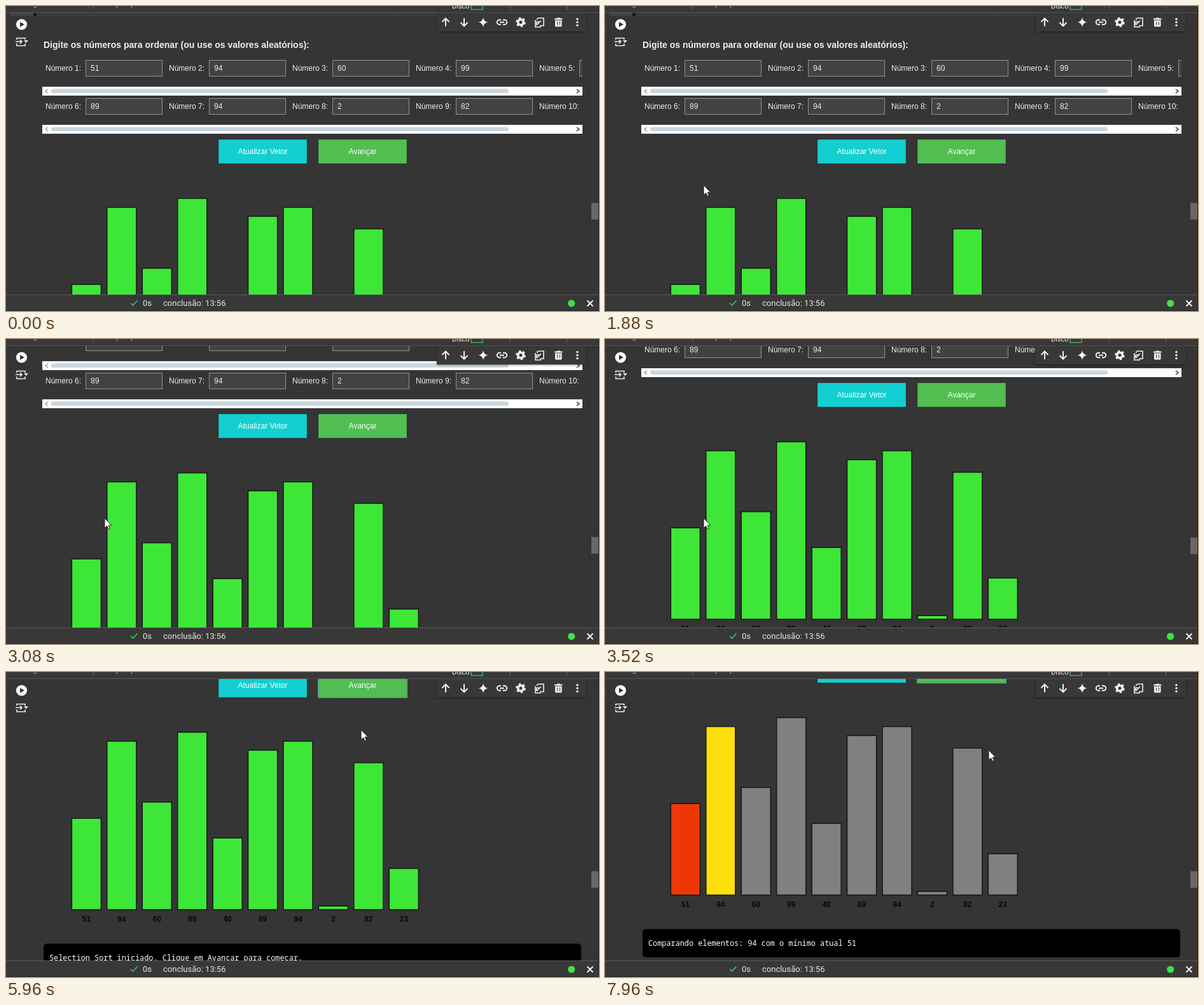
Write an HTML page that moves like this. It is 932 px wide and 480 px high and loops after 8 s.

```html
<!DOCTYPE html>
<html lang="pt-BR">
<head>
<meta charset="utf-8">
<title>Selection Sort</title>
<style>
  html, body { margin: 0; width: 100%; height: 100%; overflow: hidden; background: #353535; }
  svg { display: block; width: 932px; height: 480px; }
  text { font: 12px "Liberation Sans", Arial, sans-serif; fill: #eee; white-space: pre; }
  .heading { font-size: 14px; font-weight: bold; }
  .value { font-weight: bold; fill: #080808; text-anchor: middle; }
  .mid { text-anchor: middle; fill: #fff; }
  .console { font: 11.85px "Noto Sans Mono", monospace; fill: #fff; }
  .status { font: 13px Roboto, sans-serif; fill: #e6e6e6; }
  .menu { font: 12px Roboto, sans-serif; fill: #aaa; }
  .line { fill: none; stroke: #f2f2f2; stroke-width: 2; }

  #page, #thumb, #pointer, #focus, .before, .after { animation: 8s linear infinite; }
  #page { animation-name: scroll; }
  #thumb { animation-name: thumb; }
  #pointer { animation-name: pointer; }
  #focus { animation-name: focus; animation-timing-function: step-end; }
  .before { animation-name: before; animation-timing-function: step-end; }
  .after { animation-name: after; animation-timing-function: step-end; }

  @keyframes scroll {
    0%, 26.9% { transform: translateY(0); }
    32% { transform: translateY(-39px); }
    38.5% { transform: translateY(-92px); }
    52%, 55% { transform: translateY(-212px); }
    56%, 78.1% { transform: translateY(-208px); }
    83.7%, 100% { transform: translateY(-231px); }
  }
  @keyframes thumb {
    0%, 26.9% { transform: translateY(0); }
    52%, 100% { transform: translateY(3.6px); }
  }
  @keyframes pointer {
    0%, 5.9% { transform: translate(-20px, 440px); }
    11% { transform: translate(73px, 352px); }
    15%, 56% { transform: translate(155px, 282px); animation-timing-function: ease-in-out; }
    66%, 70.5% { transform: translate(556px, 18px); animation-timing-function: ease-in-out; }
    74%, 76% { transform: translate(558px, 91px); animation-timing-function: ease-in-out; }
    82%, 100% { transform: translate(603px, 123px); }
  }
  @keyframes focus { 0% { opacity: 0; } 68.75%, 100% { opacity: 1; } }
  @keyframes before { 0% { opacity: 1; } 76.5%, 100% { opacity: 0; } }
  @keyframes after { 0% { opacity: 0; } 76.5%, 100% { opacity: 1; } }
</style>
</head>
<body>
<svg viewBox="0 0 932 480">
  <defs>
    <clipPath id="view"><path d="M0 11H906V454H0z"/></clipPath>
    <filter id="shadow" x="-10%" y="-30%" width="120%" height="180%">
      <feDropShadow dx="0" dy="1" stdDeviation="1.5" flood-opacity=".5"/>
    </filter>
  </defs>
  <rect width="932" height="480" fill="#353535"/>
  <path d="M5.5 11V454M916.5 11V454" stroke="#303030"/>
  <path d="M0 21V39" stroke="#484848"/>

  <g clip-path="url(#view)"><g id="page"></g></g>

  <!-- menu bar -->
  <rect width="932" height="10" fill="#383838"/>
  <path d="M0 10.5H932" stroke="#555"/>
  <path d="M137.5 0V6M792.5 0V6M881.5 0V6" stroke="#666"/>
  <text class="menu" x="8" y="0">+ Código</text>
  <text class="menu" x="82" y="0">+ Texto</text>
  <text class="menu" x="158" y="0">Copiar para o disco</text>
  <text class="menu" x="828" y="0">Painel</text>
  <text class="menu" x="701" y="4" style="font-size:11px;fill:#eee">Disco</text>
  <path d="M731 0V5.5H749V0" fill="none" stroke="#3fae55" stroke-width="1.5"/>

  <!-- cell controls -->
  <circle cx="24.5" cy="29" r="8.6" fill="#fff"/>
  <path d="M22 25L29 29L22 33z" fill="#333"/>
  <g fill="none" stroke="#eee" stroke-width="1.6">
    <path d="M17 53V50.5H30V53M17 59V62.5H30V59M15 56H25M22 53L25 56L22 59"/>
  </g>
  <path d="M28 54H35L31.5 58z" fill="#eee"/>

  <!-- cell toolbar -->
  <rect x="677" y="11" width="235" height="29" fill="#383838" filter="url(#shadow)"/>
  <g class="line">
    <path d="M691 32V20M685.5 25L691 19.5L696.5 25"/>
    <path d="M720 19V31M714.5 26L720 31.5L725.5 26"/>
    <path d="M778 21.8H775.5A3.7 3.7 0 0 0 775.5 29.2H778M781 21.8H783.5A3.7 3.7 0 0 1 783.5 29.2H781M776 25.5H783"/>
    <circle cx="809" cy="25.5" r="4.3" stroke-width="3.6"/>
    <circle cx="809" cy="25.5" r="6.6" stroke-width="2.4" stroke-dasharray="3.455"/>
    <path stroke-width="1.6" d="M836 19H845V31H839M832 22V33H841M834 30V25H839M834 30L841 23M835 19V22"/>
  </g>
  <g fill="#f2f2f2">
    <path d="M750 18Q751 24.5 757.5 25.5Q751 26.5 750 33Q749 26.5 742.5 25.5Q749 24.5 750 18z"/>
    <path d="M862 19.5H865.5L866.5 18.5H870.5L871.5 19.5H874.5V21.5H862zM863 22.5H873.5V31Q873.5 32.5 872 32.5H864.5Q863 32.5 863 31z"/>
    <circle cx="898" cy="20.5" r="1.7"/><circle cx="898" cy="25.5" r="1.7"/><circle cx="898" cy="30.5" r="1.7"/>
  </g>
  <path d="M866.5 24.5V30M870.5 24.5V30" stroke="#383838"/>

  <rect id="thumb" x="920" y="310" width="12" height="26" fill="#686868"/>

  <!-- status bar -->
  <rect y="454" width="932" height="26" fill="#383838"/>
  <path d="M0 454.5H932" stroke="#5a5a5a"/>
  <path d="M0 479.5H932M931.5 0V480" stroke="#222"/>
  <path d="M196 467.5L199.5 471L206.5 463.5" fill="none" stroke="#3fc35a" stroke-width="1.7"/>
  <text class="status" x="215" y="472">0s</text>
  <text class="status" x="247" y="472">conclusão: 13:56</text>
  <circle cx="888.7" cy="468" r="5.6" fill="#42e04a"/>
  <path class="line" d="M913.5 463.5L922.5 472.5M922.5 463.5L913.5 472.5"/>

  <path id="pointer" d="M0 0V15.5L3.6 12.2L6 17.4L8.4 16.3L6.1 11.2H10.8z" fill="#fff" stroke="#111" stroke-width=".9"/>
</svg>
<script>
  const values = [51, 94, 60, 99, 40, 89, 94, 2, 82, 23];
  const baseline = 582;

  const rect = (x, y, w, h, fill, extra = '') =>
    `<rect x="${x}" y="${y}" width="${w}" height="${h}" fill="${fill}" ${extra}/>`;
  const text = (x, y, content, cls = '') => `<text x="${x}" y="${y}" class="${cls}">${content}</text>`;
  const chevron = (x, y, dir, color) =>
    `<path d="M${x - dir * 2} ${y - 3}l${dir * 4} 3l${-dir * 4} 3" fill="none" stroke="${color}" stroke-width="1.5"/>`;

  function inputRow(first, top) {
    const fields = values.slice(first, first + 5).map((value, i) => {
      const x = 62 + 194 * i;
      const boxX = x + (first + i === 9 ? 71.5 : 63.5);
      return text(x, top + 16.5, `Número ${first + i + 1}:`) +
        rect(boxX, top + .5, 120, 25, '#424242', 'stroke="#929292"') +
        text(boxX + 7.5, top + 16.5, value);
    });
    const barY = top + 42;
    return fields.join('') + rect(57, barY, 849, 14, '#fff') +
      rect(71, barY + 3.5, 719, 6.5, '#cbd6dd', 'rx="3"') +
      chevron(64, barY + 7, -1, '#999') + chevron(899, barY + 7, 1, '#333');
  }

  const button = (x, fill, label) =>
    rect(x, 210, 139, 38, fill, 'stroke="#2b2b2b" stroke-opacity=".35"') + text(x + 69.5, 233, label, 'mid');

  function chart(cls, colorOf, message) {
    const bars = values.map((value, i) => {
      const height = value * 2.82;
      return rect(103.4 + 55.43 * i, baseline - height, 46, height, colorOf(i), 'stroke="#101510" stroke-width="1.4"');
    });
    return `<g class="${cls}">${bars.join('')}${text(68, 661.5, message, 'console')}</g>`;
  }

  document.getElementById('page').innerHTML =
    rect(6, 8, 37, 7.5, '#444') + rect(43, 8, 5, 7.5, '#151515') +
    rect(48, 8, 633, 7.5, '#393939') +
    '<path d="M48 15.5H681M618.5 8V15" stroke="#4a4a4a"/>' +
    text(59, 66, 'Digite os números para ordenar (ou use os valores aleatórios):', 'heading') +
    inputRow(0, 85) + inputRow(5, 145) +
    button(334, '#13cfd0', 'Atualizar Vetor') + button(491, '#52be52', 'Avançar') +
    rect(490.5, 209.5, 140, 39, 'none', 'id="focus" stroke="#6fc4ea" stroke-dasharray="3 1"') +
    rect(59, 635.5, 845, 44.5, '#000', 'rx="5"') +
    chart('before', () => '#3ee638', 'Selection Sort iniciado. Clique em Avançar para começar.') +
    chart('after', i => ['#ee3706', '#fbe00c'][i] || '#808080', 'Comparando elementos: 94 com o mínimo atual 51') +
    values.map((value, i) => text(126.4 + 55.43 * i, baseline + 18.5, value, 'value')).join('');
</script>
</body>
</html>
```
